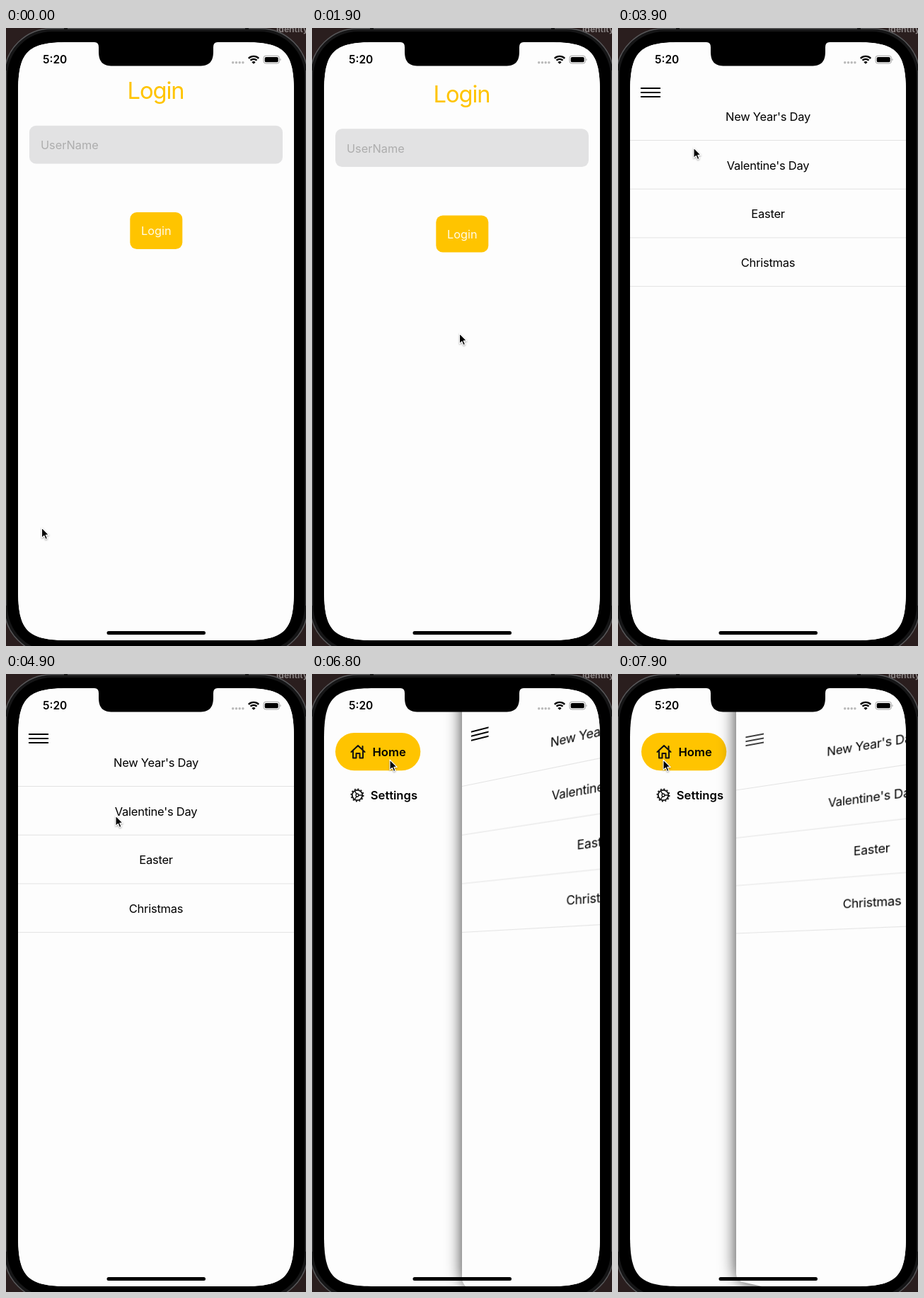
An HTML page that plays this animation: 424x872 px, repeating every 8 s.

```html
<!DOCTYPE html>
<html lang="en">
<head>
<meta charset="utf-8">
<title>Login and drawer</title>
<style>
html, body { margin: 0; width: 100%; height: 100%; overflow: hidden; background: #2a1e1e; }
#stage { position: relative; width: 424px; height: 872px; overflow: hidden; }
svg { position: absolute; left: 0; top: 0; display: block; font-family: Inter, Roboto, "Liberation Sans", sans-serif; }
#screen { position: absolute; left: 17px; top: 20px; width: 390px; height: 844px; overflow: hidden; background: #fdfdfd;
  clip-path: path("M0 72C0 13 13 0 72 0H318C377 0 390 13 390 72V772C390 831 377 844 318 844H72C13 844 0 831 0 772Z"); }
#login, #page { position: absolute; left: 0; top: 0; width: 390px; height: 844px; background: #fdfdfd; }
#dim { position: absolute; inset: 0; background: #000; }
#page { transform-origin: 0 422px; }
</style>
</head>
<body>
<div id="stage">
  <svg width="424" height="872">
    <rect width="424" height="872" fill="#2a1e1e"/>
    <text x="382" y="5.7" font-size="12" font-weight="700" fill="#8b8585">Identity</text>
    <rect x="-2.5" y=".7" width="429" height="883" rx="67" fill="#161617" stroke="#58585a" stroke-width="1.4"/>
    <path d="M.5 60V815M423.5 60V815" stroke="#353537"/>
    <path d="M82 1h5M338 1h5" stroke="#1a1a1a" stroke-width="3"/>
    <rect x="2" y="5" width="420" height="874" rx="63" fill="#000"/>
  </svg>

  <div id="screen">
    <svg width="390" height="844" viewBox="17 20 390 844" font-size="16.6" font-weight="600">
      <rect x="33" y="83" width="120.3" height="53.2" rx="26.6" fill="#ffc400"/>
      <g fill="none" stroke="#111" stroke-width="2" stroke-linejoin="round" stroke-linecap="round">
        <path d="M55.5 110 65 101l9.5 9M58 108.5V118.5H62.5V112H67.5V118.5H72V108.5M71.5 106.5V102"/>
        <circle cx="64" cy="171" r="7.2" stroke-width="1.8"/>
        <circle cx="64" cy="171" r="8.7" stroke-width="1.6" stroke-linecap="butt" stroke-dasharray="2.1 2.455"/>
        <circle cx="64" cy="171" r="2" stroke-width="1.3"/>
        <path d="M66 171h5M63 169.300l-2.500-4.300M63 172.700l-2.500 4.300" stroke-width="1.4"/>
      </g>
      <text x="85.5" y="116">Home</text>
      <text x="82.8" y="177">Settings</text>
    </svg>

    <div id="login">
      <svg width="390" height="844" viewBox="17 20 390 844">
        <g id="form">
          <text x="211.5" y="100" font-size="32.7" letter-spacing="-1.1" text-anchor="middle" fill="#ffc400">Login</text>
          <rect x="33" y="137.7" width="358" height="53.8" rx="9.5" fill="#e2e2e3"/>
          <text x="49" y="171" font-size="16.3" fill="#adadad">UserName</text>
          <g id="button">
            <rect x="175.3" y="260" width="74" height="52" rx="9.5" fill="#ffc400"/>
            <text x="212.3" y="292" font-size="16.3" text-anchor="middle" fill="#fffbe8">Login</text>
          </g>
        </g>
      </svg>
      <div id="dim"></div>
    </div>

    <div id="page">
      <svg width="390" height="844" viewBox="17 20 390 844">
        <path id="burger" d="M32 85H60M32 91H60M32 97H60" stroke="#000" stroke-width="2.2"/>
        <g id="list" font-size="16.5" letter-spacing="-.25" text-anchor="middle"></g>
      </svg>
    </div>
  </div>

  <svg width="424" height="872">
    <path d="M125 18V20Q131 20 131 27V33C131 48 137 53.600 151 53.600H273C287 53.600 293 48 293 33V27Q293 20 299 20V18Z"/>
    <text x="52" y="50.3" font-size="15.5" font-weight="600">5:20</text>
    <g fill="#b9b9b9">
      <circle cx="320.7" cy="48.7" r="1.7"/><circle cx="325.5" cy="48.7" r="1.7"/>
      <circle cx="330.2" cy="48.7" r="1.7"/><circle cx="334.9" cy="48.7" r="1.7"/>
    </g>
    <g fill="none" stroke="#000" stroke-width="2.4">
      <path d="M342.8 42.9A10.2 10.2 0 0 1 357.2 42.9M345.5 45.7A6.4 6.4 0 0 1 354.5 45.7"/>
      <path d="M350 50.8 347.4 48.2A3.7 3.7 0 0 1 352.6 48.2Z" fill="#000" stroke="none"/>
    </g>
    <rect x="364" y="39.2" width="22.4" height="10.8" rx="3.2" fill="none" stroke="#a2a2a2"/>
    <rect x="365.7" y="40.9" width="19" height="7.4" rx="1.9"/>
    <path d="M387.5 42.8Q389.6 44.6 387.5 46.6Z" fill="#a2a2a2"/>
    <rect x="142.5" y="851" width="139.5" height="5" rx="2.5"/>
    <path id="cursor" d="M0 0V14.300L3.300 11.300 5.500 16.400 8 15.300 5.800 10.400H10.200Z" stroke="#fff" stroke-width="1.1" stroke-linejoin="round" style="filter:drop-shadow(0 1px 1px rgba(0,0,0,.35))"/>
  </svg>
</div>

<script>
const LOOP = 8000, STEP = 100, HEIGHT = 844, WIDTH = 390;
const PUSH = 2476, OPEN = 5870, CLOSE = 6950, REOPEN = 7655;
const $ = id => document.getElementById(id);
const [form, login, button, dim, page, burger, list, cursor] =
  ["form", "login", "button", "dim", "page", "burger", "list", "cursor"].map($);

list.innerHTML = ["New Year's Day", "Valentine's Day", "Easter", "Christmas"].map((name, i) => {
  const y = 68.7 * i;
  return `<text x="212" y="${131 + y}">${name}</text>
    <path d="M17 ${158.5 + y}H407" stroke="#e3e3e3"/>`;
}).join("");

// time, x, y of the pointer tip
const pointer = [
  [0, 50.5, 705], [900, 197, 344], [1000, 200, 338], [1400, 205, 565], [1500, 205, 565],
  [2300, 212, 297], [2450, 216, 299], [2650, 216, 299], [3600, 107, 169], [3900, 107, 169],
  [4180, 109, 330], [4220, 109, 330], [4900, 155, 200], [5100, 155, 200], [5700, 38, 90],
  [5900, 38, 90], [6600, 110, 121], [6960, 110, 121], [7550, 38, 90], [7720, 38, 90], [7900, 64, 121]
];

const clamp = v => Math.min(1, Math.max(0, v));
const ease = v => { v = clamp(v); return v * v * (3 - 2 * v); };
const settle = (ms, rate) => { const a = Math.max(0, ms) * rate / 1000; return (1 + a) * Math.exp(-a); };
const rubber = d => HEIGHT * (1 - 1 / (Math.max(0, d) * .55 / HEIGHT + 1));

function pointerAt(t) {
  const i = pointer.findIndex(k => k[0] > t);
  if (i < 0) return pointer[pointer.length - 1].slice(1);
  const a = pointer[i - 1], b = pointer[i], e = ease((t - a[0]) / (b[0] - a[0]));
  return [a[1] + (b[1] - a[1]) * e, a[2] + (b[2] - a[2]) * e];
}

// Overscroll follows the pointer, then springs back.
function pull(t, start, end, rate) {
  if (t < start) return 0;
  const from = pointerAt(start)[1], y = pointerAt(Math.min(t, end))[1];
  const offset = rubber(y - from) * settle(t - end, rate);
  return offset < .3 ? 0 : offset;
}

// A press fades the control, which then recovers.
function pressed(t, release, low, recover) {
  if (t < release - 120) return 1;
  return low + (1 - low) * clamp((t - release) / recover);
}

function drawerAt(t) {
  const run = start => ease((t - start) / 350);
  return run(OPEN) - run(CLOSE) + run(REOPEN);
}

function placePage(shift, u) {
  const s = 1 - .113 * u * (1 - u), k = .00061 * u, c = Math.cos(.555 * u);
  const x = WIDTH / 2 * u;
  page.style.transform =
    `matrix3d(${s * (c - x * k)},0,0,${-k},0,${s},0,0,0,0,1,0,${s * x + shift},0,0,1)`;
  page.style.borderRadius = 12 * u + "px";
  const shade = Math.max(.78 * Math.min(1, u * 2), shift > 0 ? .08 : 0);
  page.style.boxShadow = `0 0 27px rgba(0,0,0,${shade})`;
}

function draw(t) {
  const [x, y] = pointerAt(t);
  cursor.setAttribute("transform", `translate(${x} ${y})`);

  const left = t < PUSH ? 1 : settle(t - PUSH, 18.26);
  const shift = left < .001 ? 0 : WIDTH * left;
  form.setAttribute("transform", `translate(0 ${pull(t, 1000, 1450, 11)})`);
  button.setAttribute("opacity", pressed(t, 2450, .4, 375));
  login.style.display = t < 3200 ? "" : "none";
  login.style.transform = `translateX(${-.3 * WIDTH * (1 - left)}px)`;
  dim.style.opacity = .1 * (1 - left);

  page.style.display = t < PUSH ? "none" : "";
  placePage(shift, drawerAt(t));
  list.setAttribute("transform", `translate(0 ${pull(t, 3900, 4200, 11.7)})`);
  const release = t < 7000 ? OPEN : REOPEN;
  burger.setAttribute("opacity", pressed(t, release, .3, 380));
}

// The picture advances in tenths of a second.
const begin = performance.now();
function tick() {
  const t = (performance.now() - begin) % LOOP;
  draw(Math.floor(t / STEP) * STEP);
  requestAnimationFrame(tick);
}
tick();
</script>
</body>
</html>
```
